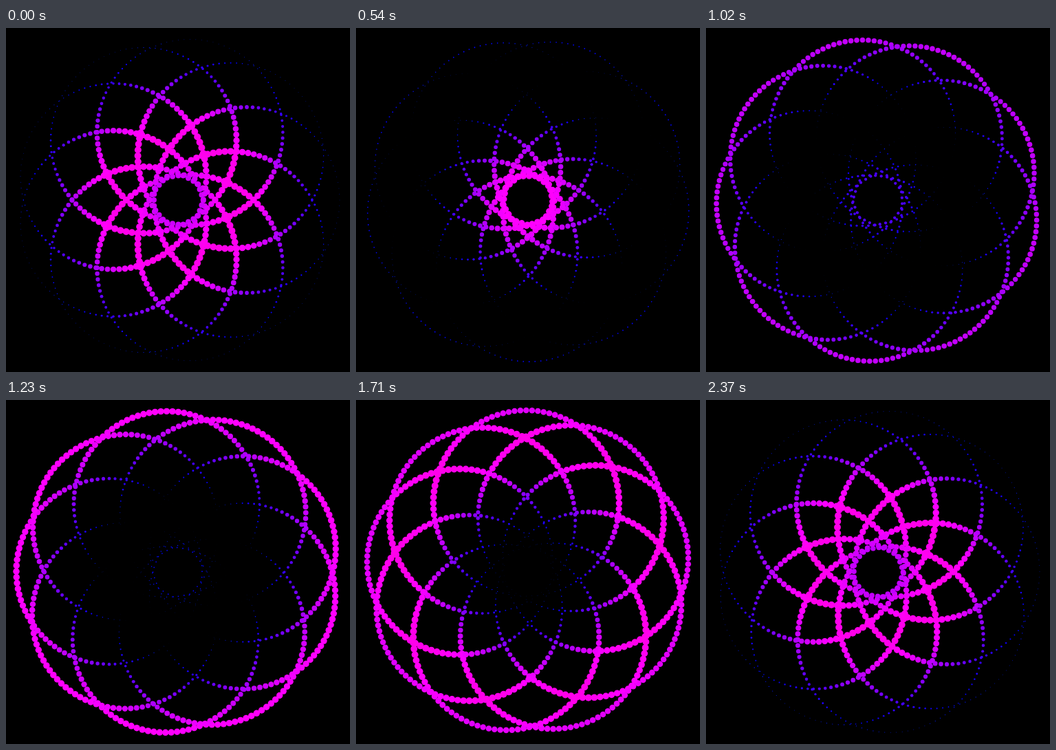
An HTML page with a canvas for the animation above (2.4 s loop, 500 px wide and 500 px high).

```html
<!DOCTYPE html>
<html lang="en">
<head>
<meta charset="utf-8">
<title>Dotted rings</title>
<style>
  html, body { margin: 0; height: 100%; overflow: hidden; background: #000; }
  canvas { display: block; }
</style>
</head>
<body>
<canvas width="500" height="500"></canvas>
<script>
const ctx = document.querySelector('canvas').getContext('2d');
const TAU = 2 * Math.PI;
const STEP_MS = 30, STEPS = 80;
const RINGS = 9, DOTS = 100;
const ORBIT = 100, RING_RADIUS = 135;
const WAVELENGTH = Math.hypot(250, 250);
const MAX_DOT_RADIUS = 5;

function drawDot(x, y, t) {
  const wave = (1 + Math.sin(TAU * (t + Math.hypot(x, y) / WAVELENGTH))) / 2;
  ctx.fillStyle = `hsl(${225 + 80 * wave}, 100%, 50%)`;
  ctx.beginPath();
  ctx.arc(250 + x, 250 + y, MAX_DOT_RADIUS * wave, 0, TAU);
  ctx.fill();
}

function draw() {
  const t = Math.floor(performance.now() / STEP_MS) % STEPS / STEPS;
  ctx.fillStyle = '#000';
  ctx.fillRect(0, 0, 500, 500);
  // Ring centres advance by one slot per loop; the dots keep their angles.
  for (let i = 0; i < RINGS; i++) {
    const orbit = TAU * (i + t) / RINGS;
    for (let j = 0; j < DOTS; j++) {
      const angle = TAU * j / DOTS;
      drawDot(
        ORBIT * Math.cos(orbit) + RING_RADIUS * Math.cos(angle),
        ORBIT * Math.sin(orbit) + RING_RADIUS * Math.sin(angle),
        t
      );
    }
  }
  requestAnimationFrame(draw);
}
draw();
</script>
</body>
</html>
```
